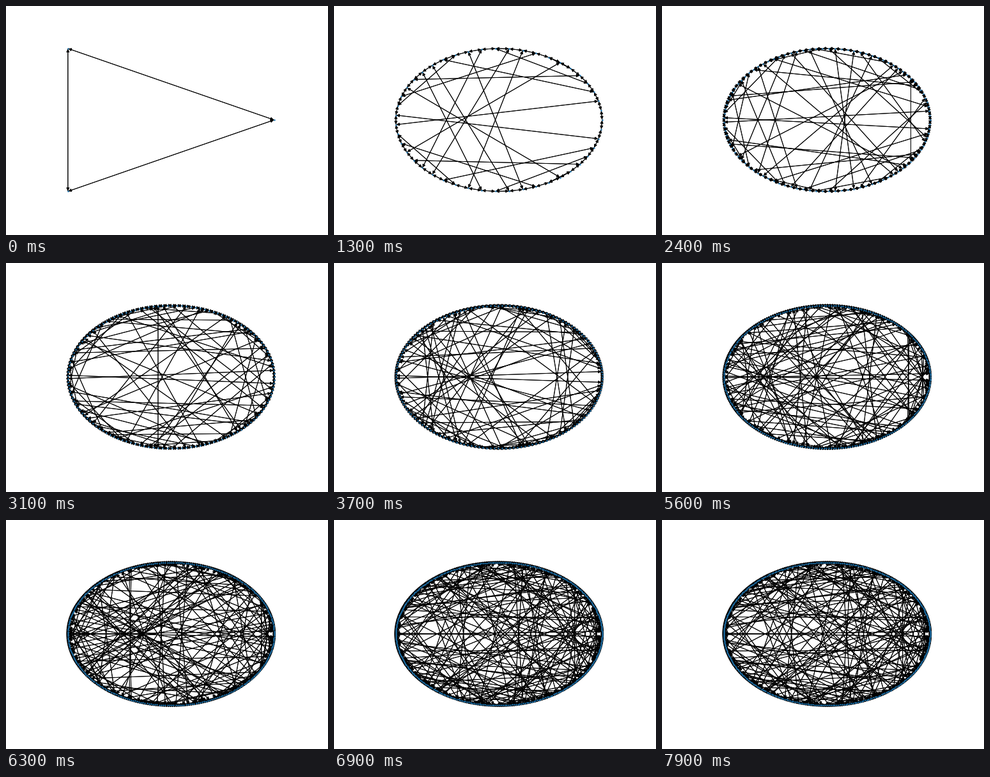
A matplotlib script for the animation above (8000 ms loop, 504 by 360 pixels).

```python
import numpy as np
import matplotlib.pyplot as plt
from matplotlib.animation import FuncAnimation
from matplotlib.collections import LineCollection, PolyCollection

W, H = 504, 360
FRAMES, STEP_MS = 80, 100
PEAK = 74  # the prime index climbs to here, then walks back

# Plot area in pixels; the graph fills it with a double margin.
LEFT, RIGHT, BOTTOM, TOP = 0.125 * W, 0.9 * W, 0.125 * H, 0.88 * H
MARGIN = 1.21

NODE_SIZE = 1
SHRINK = np.sqrt(NODE_SIZE) / 2
HEAD_LENGTH, HEAD_HALF = 4.0, 2.0
HEAD_PAD = 0.5 * np.hypot(HEAD_LENGTH, HEAD_HALF) / HEAD_HALF


def odd_primes(count):
    found, n = [], 3
    while len(found) < count:
        if all(n % q for q in found if q * q <= n):
            found.append(n)
        n += 2
    return found


PRIMES = odd_primes(PEAK + 1)


def fit(values, low, high):
    a, b = values.min(), values.max()
    return (low + high) / 2 + (values - (a + b) / 2) / (b - a) * (high - low) / MARGIN


def node_positions(p):
    angle = 2 * np.pi * np.arange(p) / p
    return np.column_stack([fit(np.cos(angle), LEFT, RIGHT),
                            fit(np.sin(angle), BOTTOM, TOP)])


def chordal_edges(p):
    """Each x points to both neighbours and to its inverse modulo p."""
    edges = []
    for x in range(p):
        for y in ((x - 1) % p, (x + 1) % p, pow(x, p - 2, p)):
            if x != y:
                edges.append((x, y))
    return np.array(edges)


def arrows(start, end):
    """Shafts and triangular heads for straight arrows."""
    d = end - start
    d /= np.hypot(d[:, 0], d[:, 1])[:, None]
    side = np.column_stack([-d[:, 1], d[:, 0]]) * HEAD_HALF
    tail = start + d * SHRINK
    tip = end - d * (SHRINK + HEAD_PAD)
    base = tip - d * HEAD_LENGTH
    shafts = np.stack([tail, tip], axis=1)
    heads = np.stack([base + side, tip, base - side], axis=1)
    return shafts, heads


fig = plt.figure(figsize=(W / 72, H / 72), dpi=72, facecolor="white")
ax = fig.add_axes((0, 0, 1, 1))
ax.set_xlim(0, W)
ax.set_ylim(0, H)
ax.axis("off")

shaft_art = LineCollection([], colors="black", linewidths=1,
                           capstyle="round", zorder=1)
head_art = PolyCollection([], facecolors="black", edgecolors="black",
                          linewidths=1, joinstyle="round", zorder=1)
for art in (shaft_art, head_art):
    art.set_snap(False)
    ax.add_collection(art, autolim=False)
node_art = ax.scatter([0], [0], s=NODE_SIZE, c="#1f78b4", linewidths=1.5, zorder=2)


def draw(frame):
    p = PRIMES[PEAK - abs(PEAK - frame)]
    pos = node_positions(p)
    edges = chordal_edges(p)
    shafts, heads = arrows(pos[edges[:, 0]], pos[edges[:, 1]])
    shaft_art.set_segments(shafts)
    head_art.set_verts(heads)
    node_art.set_offsets(pos)
    return shaft_art, head_art, node_art


anim = FuncAnimation(fig, draw, frames=FRAMES, init_func=lambda: draw(0),
                     interval=STEP_MS, repeat=True, repeat_delay=0)
plt.show()
```
